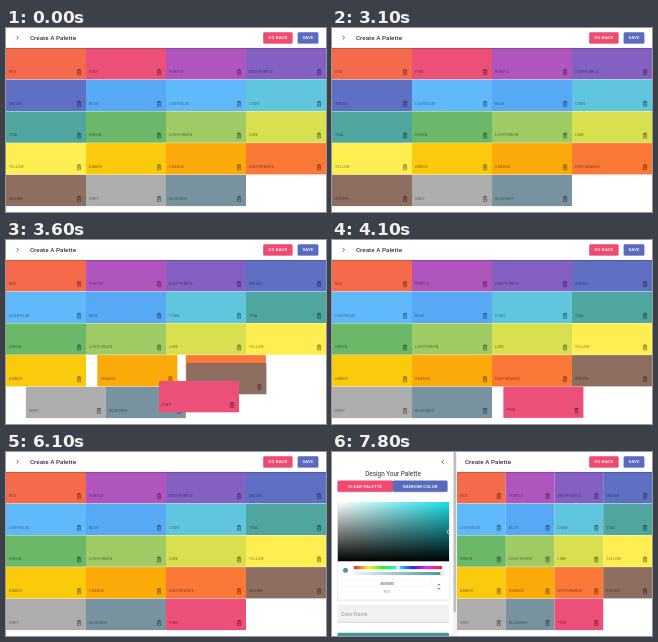
An HTML page for the animation above (8000 ms loop, 320 px wide and 184 px high).

```html
<!DOCTYPE html>
<html lang="en">
<head>
<meta charset="utf-8">
<title>Create A Palette</title>
<style>
  html, body { margin: 0; width: 100%; height: 100%; overflow: hidden; background: #fff; }
  svg { display: block; width: 100vw; height: 100vh; font-family: Roboto, Arial, sans-serif; }
  .btn { font-size: 4.375px; font-weight: 500; letter-spacing: .12px; fill: #fff; text-anchor: middle; }
  .label { font-size: 3.45px; letter-spacing: .31px; fill: #000; fill-opacity: .5; }
  .title { font-size: 6.25px; font-weight: 500; letter-spacing: .04px; fill: #333; }
  .line { fill: none; stroke: #444; stroke-width: .8; }
  .mid { text-anchor: middle; }
  .knob { fill: #f8f8f8; stroke: #aaa; stroke-width: .3; }
</style>
</head>
<body>
<svg viewBox="0 0 320 184" preserveAspectRatio="none">
  <defs>
    <linearGradient id="shade" x2="0" y2="1">
      <stop stop-color="#000" stop-opacity=".28"/><stop offset="1" stop-color="#000" stop-opacity="0"/>
    </linearGradient>
    <linearGradient id="sat"><stop stop-color="#fff"/><stop offset="1" stop-color="#19dde6"/></linearGradient>
    <linearGradient id="dark" x2="0" y2="1">
      <stop stop-color="#000" stop-opacity="0"/><stop offset="1" stop-color="#000"/>
    </linearGradient>
    <linearGradient id="alpha">
      <stop stop-color="#459a9a" stop-opacity=".1"/><stop offset="1" stop-color="#459a9a"/>
    </linearGradient>
    <linearGradient id="hue"></linearGradient>
    <clipPath id="satClip"><rect x="5.5" y="50" width="111.5" height="59.5"/></clipPath>
    <g id="bin" fill="none" stroke="#000" stroke-opacity=".55" stroke-width="2">
      <path d="M5 5H19M9 4H15M7 8V20H17V8ZM10 11L14 16M14 11L10 16"/>
    </g>
  </defs>

  <rect width="320" height="184" fill="#fff"/>
  <g id="boxes"></g>
  <rect y="19.6" width="320" height="2.2" fill="url(#shade)"/>
  <rect width="320" height="19.7" fill="#fff"/>
  <path id="menu" class="line" d="M10.6 7.9l1.9 1.9l-1.9 1.9"/>
  <text id="heading" class="title" y="12.2">Create A Palette</text>
  <g id="actions"></g>

  <g id="drawer">
    <rect width="125" height="184" fill="#fff"/>
    <path class="line" d="M111.7 7.9l-1.9 1.9l1.9 1.9"/>
    <text class="mid" x="61" y="23.6" font-size="6.4" fill="#333">Design Your Palette</text>
    <g id="tools"></g>

    <rect x="5" y="50" width="112.5" height="98.5" rx=".8" fill="#000" fill-opacity=".14"/>
    <rect x="5.5" y="50" width="111.5" height="97.7" rx=".6" fill="#fff"/>
    <g clip-path="url(#satClip)">
      <rect x="5.5" y="50" width="111.5" height="59.5" fill="url(#sat)"/>
      <rect x="5.5" y="50" width="111.5" height="59.5" fill="url(#dark)"/>
      <circle cx="117" cy="79.8" r="1.8" fill="none" stroke="#fff" stroke-width=".6"/>
    </g>
    <circle cx="13.5" cy="118.3" r="2.5" fill="#459a9a"/>
    <rect x="22" y="114" width="88" height="3.1" fill="url(#hue)"/>
    <rect x="22" y="120" width="88" height="3.1" fill="url(#alpha)"/>
    <circle class="knob" cx="66" cy="115.5" r="1.9"/>
    <circle class="knob" cx="110" cy="121.5" r="1.9"/>
    <rect x="10.5" y="128.2" width="89" height="6.4" rx=".6" fill="#fff" stroke="#e4e4e4" stroke-width=".3"/>
    <text class="mid" x="55" y="132.7" font-size="3.4" fill="#444">#008080</text>
    <text class="mid" x="55" y="141.4" font-size="3.4" fill="#999">HEX</text>
    <path class="line" d="M105.6 133.4l1.3-1.3l1.3 1.3M105.6 136l1.3 1.3l1.3-1.3"/>

    <path d="M5.5 170.3V154q0-1.3 1.3-1.3H115.700q1.3 0 1.3 1.300V170.3Z" fill="#f1f1f1"/>
    <path d="M5.5 170.300H117" stroke="#999" stroke-width=".35"/>
    <text x="9" y="164" font-size="5" fill="#999">Color Name</text>
    <rect x="5.5" y="180.7" width="111.5" height="8" rx="1.2" fill="#459696"/>
    <rect x="121" width="4" height="184" fill="#f3f3f3"/>
    <rect x="121.5" width="2.6" height="160" rx="1" fill="#bfbfbf"/>
  </g>
</svg>

<script>
const LOOP = 8000, TOP = 20, ROW = 31.7, BOX_H = 31.3, DRAWER = 125;
const $ = id => document.getElementById(id);

function add(parent, tag, attrs, text) {
  const el = document.createElementNS('http://www.w3.org/2000/svg', tag);
  for (const k in attrs) el.setAttribute(k, attrs[k]);
  if (text) el.textContent = text;
  return parent.appendChild(el);
}

function button(parent, x, y, w, fill, text) {
  add(parent, 'rect', { x: x - .2, y: y + .6, width: w + .4, height: 11.2, rx: 1.3, fill: '#000', 'fill-opacity': .18 });
  add(parent, 'rect', { x, y, width: w, height: 11.2, rx: 1.25, fill });
  add(parent, 'text', { class: 'btn', x: x + w / 2, y: y + 7.2 }, text);
}
const PINK = '#f1496f', BLUE = '#596abf';
button($('actions'), 257.3, 4.2, 29.2, PINK, 'GO BACK');
button($('actions'), 291.7, 4.2, 20.6, BLUE, 'SAVE');
button($('tools'), 5.500, 28.600, 55.5, PINK, 'CLEAR PALETTE');
button($('tools'), 61, 28.6, 54.5, BLUE, 'RANDOM COLOR');

for (let i = 0; i <= 6; i++)
  add($('hue'), 'stop', { offset: i / 6, 'stop-color': `hsl(${i * 60} 90% 55%)` });

const palette = `RED f56a4a,PINK ec5078,PURPLE b055bd,DEEPPURPLE 8560c3,INDIGO 5f6fc3,BLUE 57a9f5,
LIGHTBLUE 5fb9fb,CYAN 60c6dd,TEAL 4fa69e,GREEN 6ab868,LIGHTGREEN 9fca64,LIME d8e050,YELLOW ffee52,
AMBER fbca0c,ORANGE fbaa0a,DEEPORANGE fb7836,BROWN 8f6e62,GREY adadad,BLUEGREY 78929f`;

// Hand-held boxes: [time, x, y] points, then a glide into the free slot.
const drags = {
  LIGHTBLUE: [[1900, 160, 51.7], [2000, 135, 58], [2200, 100, 60], [2500, 84, 56]],
  PINK: [[3150, 80, 20], [3300, 88, 100], [3432, 122, 117], [3465, 130, 130],
         [3600, 153, 141], [4000, 172, 147], [4500, 169, 145], [4900, 169, 145]]
};

const boxes = palette.split(',').map((entry, i) => {
  const [name, hex] = entry.trim().split(' ');
  const g = add($('boxes'), 'g', {});
  const rect = add(g, 'rect', { height: BOX_H, fill: '#' + hex });
  add(g, 'text', { class: 'label', x: 3.1, y: 24.9 }, name);
  const bin = add(g, 'use', { href: '#bin' });
  const start = name === 'BLUE' ? 6 : name === 'LIGHTBLUE' ? 5 : i;
  return { name, i, start, g, rect, bin, path: drags[name] };
});
boxes.filter(b => b.path).forEach(b => $('boxes').append(b.g));

const clamp = v => Math.max(0, Math.min(1, v));
const mix = (a, b, p) => a + (b - a) * p;

function bezier(x1, y1, x2, y2) {
  const at = (a, b, s) => 3 * a * s * (1 - s) ** 2 + 3 * b * s * s * (1 - s) + s ** 3;
  return x => {
    x = clamp(x);
    let lo = 0, hi = 1;
    for (let n = 0; n < 24; n++) {
      const m = (lo + hi) / 2;
      if (at(x1, x2, m) < x) lo = m; else hi = m;
    }
    return x === 0 || x === 1 ? x : at(y1, y2, lo);
  };
}
const ease = bezier(.25, .1, .25, 1), easeOut = bezier(0, 0, .2, 1);

// When the box at slot k steps back as the pink one is carried past.
const passTime = k => k <= 5 ? 3215 : k <= 9 ? 3255 : k <= 13 ? 3300 : k === 14 ? 3432 : 3465;

function place(b, t, left, w) {
  const slot = k => [left + k % 4 * w, TOP + Math.floor(k / 4) * ROW];
  const glide = (from, to, t0) => {
    const p = ease((t - t0) / 300);
    return [mix(from[0], to[0], p), mix(from[1], to[1], p)];
  };
  const path = b.path;
  const end = path && path[path.length - 1];
  if (path && t >= path[0][0] && t < end[0] + 300) {
    if (t >= end[0]) return glide(end.slice(1), slot(b.name === 'PINK' ? 18 : 5), end[0]);
    const n = path.findIndex(k => k[0] > t), a = path[n - 1], z = path[n];
    const p = (t - a[0]) / (z[0] - a[0]);
    return [mix(a[1], z[1], p), mix(a[2], z[2], p)];
  }
  if (b.name === 'PINK') return slot(t < 3150 ? 1 : 18);
  if (t < 2900) return b.name === 'BLUE' ? glide(slot(5), slot(6), 2120) : slot(b.i);
  const k = b.start;
  return k < 2 ? slot(k) : glide(slot(k), slot(k - 1), passTime(k));
}

function draw(t) {
  const left = DRAWER * easeOut((t - 6460) / 225);
  const slide = DRAWER * easeOut((t - 6440) / 225);
  const open = t >= 6440, w = (320 - left) / 4;
  for (const b of boxes) {
    const [x, y] = place(b, t, left, w);
    b.g.setAttribute('transform', `translate(${x} ${y})`);
    b.rect.setAttribute('width', w);
    b.bin.setAttribute('transform', `translate(${w - 10.7} 20.4) scale(.3125)`);
  }
  $('menu').setAttribute('visibility', open ? 'hidden' : 'visible');
  $('heading').setAttribute('x', open ? left + 8 : 24);
  $('drawer').setAttribute('transform', `translate(${slide - DRAWER} 0)`);
}

const begin = performance.now();
function tick() {
  draw((performance.now() - begin) % LOOP);
  requestAnimationFrame(tick);
}
tick();
</script>
</body>
</html>
```
